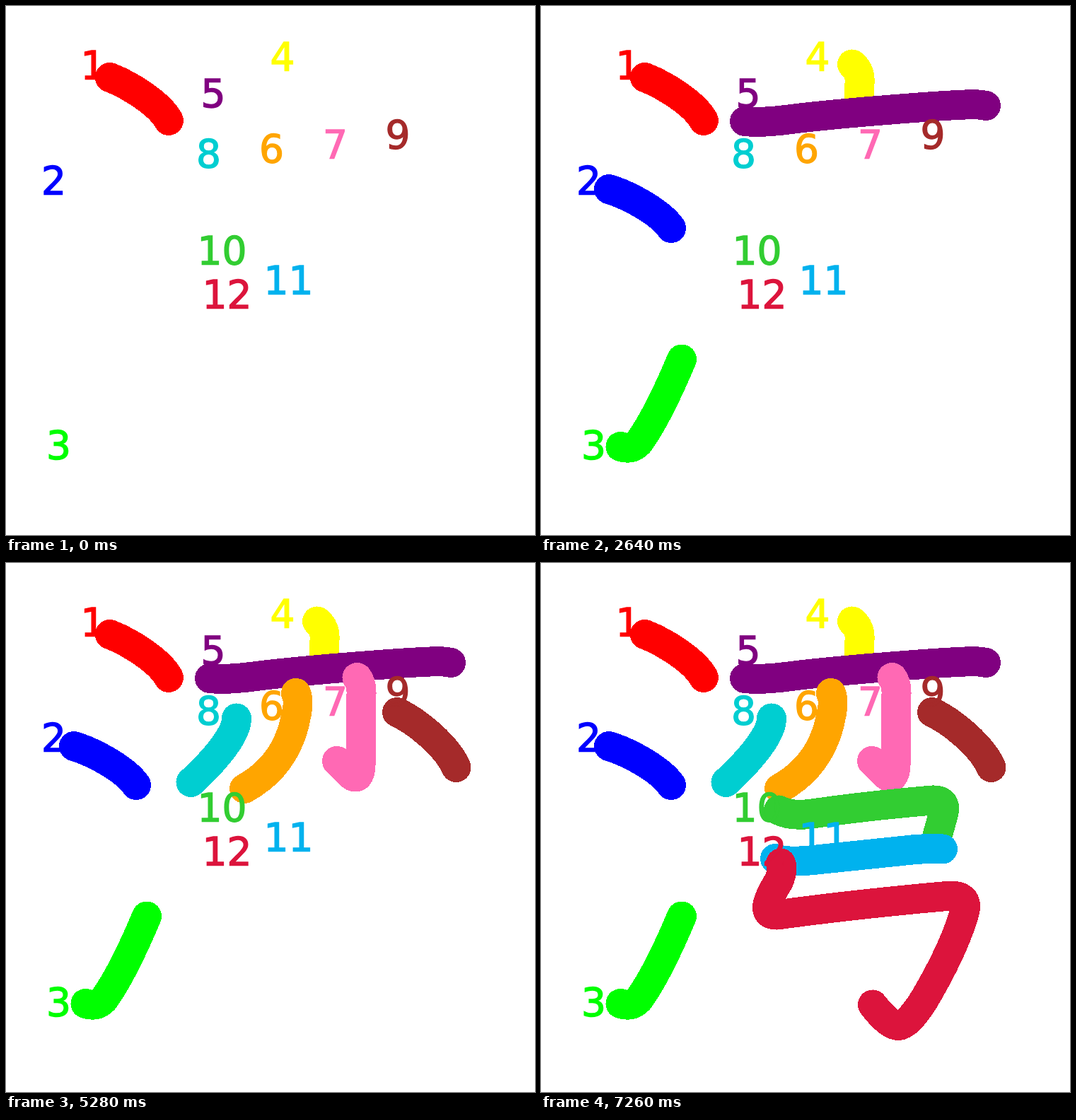
Recreate the animation shown at these times as an HTML page. Size 748 by 748 pixels, loop 7920 ms.

```html
<!DOCTYPE html>
<html>
<head>
<meta charset="utf-8">
<style>
  html, body { margin: 0; width: 100%; height: 100%; overflow: hidden; background: #fff; }
  svg { display: block; width: 100%; height: 100%; }
  path { fill: none; stroke-width: 42; stroke-linecap: round; stroke-linejoin: round; shape-rendering: crispEdges; }
  text { font: 55px "DejaVu Sans", sans-serif; stroke-width: 1.4; }
</style>
</head>
<body>
<svg viewBox="0 0 748 748"><g id="lines"></g><g id="labels"></g></svg>
<script>
const STEP = 660;

// colour, label x, label baseline, path
const strokes = [
  ["red", 105.5, 102.5, "M147 101C175 112 217 138 230 162"],
  ["blue", 50, 265.5, "M96 259C126 268 170 293 184 314"],
  ["lime", 57, 639.5, "M112.5 623Q131 629 140.5 614Q166 578 199 499.5"],
  ["yellow", 373.5, 91, "M440 82.5Q452 92 450.5 110L449.5 142"],
  ["purple", 275.5, 142.5, "M288 163Q312 165.5 350 160.5C420 151.5 560 141 600 139.5Q618 138.5 629 141"],
  ["orange", 358, 221, "M410 184Q415 195 410 217Q397 286 337 319"],
  ["hotpink", 448, 214.5, "M496.5 162Q503 170 502.5 185L501.5 288Q500 302 494 302.5Q490 302.5 485 297L468 280"],
  ["darkturquoise", 269, 228, "M326 219.5C327 244 288 286 261.5 310"],
  ["brown", 536.5, 200.5, "M553 211C583 225 624 260 636.5 289"],
  ["limegreen", 270.5, 365, "M336 349.5Q352 358 380 355Q460 343.5 548 336Q575 332 569 355L557 398"],
  ["#00b2ee", 364.5, 406.5, "M331 418Q348 424 385 420L520 406Q540 403.5 568 404.5"],
  ["crimson", 277.5, 427, "M339 424.5Q343 434 336 450Q320 476 320 487Q320 498 334 497.5Q440 483 568 471.5Q606 466 599 493Q585 544 542 617Q519 654 505 654Q492 654 469 624.5"]
];

function add(parent, tag, attrs) {
  const el = document.createElementNS("http://www.w3.org/2000/svg", tag);
  for (const key in attrs) el.setAttribute(key, attrs[key]);
  return parent.appendChild(el);
}

const lines = document.getElementById("lines");
const labels = document.getElementById("labels");
const paths = strokes.map(([color, x, y, d], i) => {
  add(labels, "text", { x, y, fill: color, stroke: color }).textContent = i + 1;
  return add(lines, "path", { d, stroke: color });
});

const start = performance.now();
function draw(now) {
  const time = Math.max(0, now - start) % (STEP * strokes.length);
  const last = Math.floor(time / STEP);
  paths.forEach((path, i) => path.style.display = i <= last ? "" : "none");
  requestAnimationFrame(draw);
}
draw(start);
</script>
</body>
</html>
```
